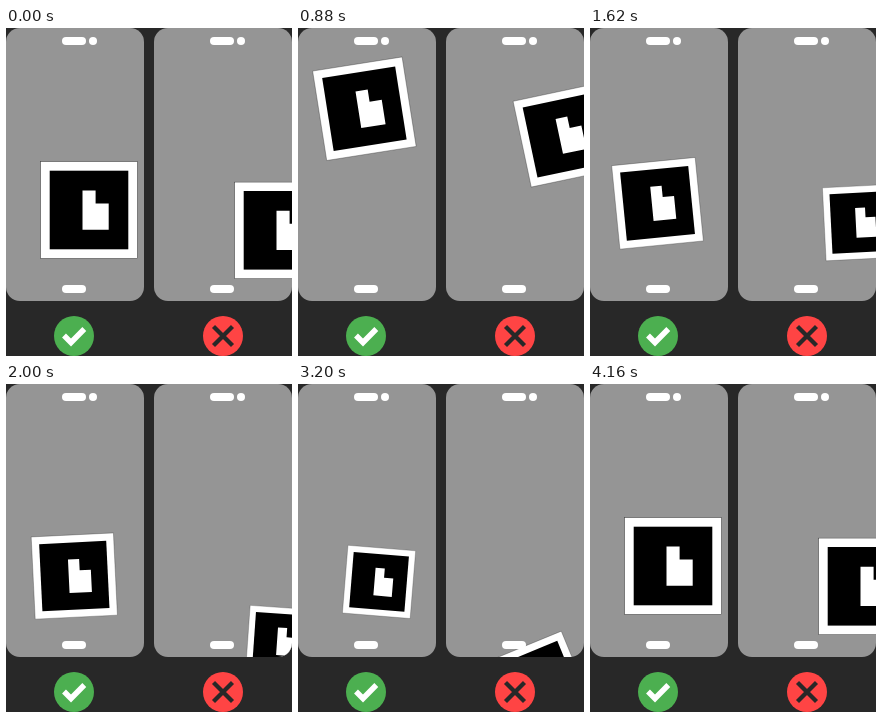
An HTML page that plays this animation: 286x328 px, repeating every 4180 ms.

```html
<!DOCTYPE html>
<html lang="en">
<head>
<meta charset="utf-8">
<title>Marker tracking</title>
<style>
  html, body { margin: 0; height: 100%; overflow: hidden; background: #282828; }
  svg { display: block; width: 100vw; height: 100vh; }
</style>
</head>
<body>
<svg viewBox="0 0 286 328">
  <defs>
    <clipPath id="screen"><rect width="138" height="273" rx="14"/></clipPath>
    <rect id="body" width="138" height="273" rx="14" fill="#959595"/>
    <g id="marker">
      <rect x="-48.2" y="-48.2" width="96.4" height="96.4" fill="#fff" stroke="#222" stroke-width=".35"/>
      <rect x="-39.3" y="-39.3" width="78.6" height="78.6"/>
      <path d="M-6.5-19.6h13.100v13.100h13.100v26.200h-26.200z" fill="#fff"/>
    </g>
    <g id="details" fill="#fff">
      <rect x="56" y="9" width="24" height="8" rx="4"/>
      <circle cx="87" cy="13" r="4"/>
      <rect x="56" y="257" width="24" height="8" rx="4"/>
    </g>
  </defs>
  <rect width="286" height="328" fill="#282828"/>
  <g>
    <use href="#body"/>
    <g clip-path="url(#screen)"><use id="good" href="#marker"/></g>
    <use href="#details"/>
  </g>
  <g transform="translate(148)">
    <use href="#body"/>
    <g clip-path="url(#screen)"><use id="bad" href="#marker"/></g>
    <use href="#details"/>
  </g>
  <g fill="none">
    <circle cx="68" cy="308" r="20" fill="#4caf50"/>
    <path d="M58 307.500l7 7L78.300 301" stroke="#fff" stroke-width="5.500"/>
    <circle cx="217" cy="308" r="20" fill="#ff4444"/>
    <path d="M207.500 298.500l19 19m0-19l-19 19" stroke="#282828" stroke-width="4.300"/>
  </g>
</svg>
<script>
const LOOP = 4180;
const REST = 4160; // both markers are back at their first pose and hold

// Key poses shared in time by both markers; each curve returns to its first value
const times = [0, 460, 900, 1300, 1640, 2000, 2660, 3740, REST];
const markers = {
  good: {
    x: [83, 83.5, 66, 66, 67.6, 68.3, 78, 82],
    y: [182, 82, 82, 134, 177, 192, 206, 185.3],
    side: [96, 94.5, 90, 85, 83.5, 82, 70, 77],
    angle: [0, -6, -9, -8.1, -5.5, -2.8, 0, 5.8]
  },
  bad: {
    x: [129, 121.6, 119, 119, 123, 127.6, 116.6, 91.2],
    y: [202.3, 138, 107, 132, 198, 257.4, 292, 268.6],
    side: [96, 94, 87, 79.2, 72.5, 67.5, 70, 91.4],
    angle: [0, -8.5, -12, -10.2, -2.5, 4, -7.5, -23.2]
  }
};

// Smooth curve through the key values, at rest at both ends
function sample(values, time) {
  const last = values.length;
  const value = i => values[i % last];
  const span = i => times[i + 1] - times[i];
  const rate = i => (value(i + 1) - value(i)) / span(i);
  const tangent = i => i % last === 0 ? 0
    : (rate(i - 1) * span(i) + rate(i) * span(i - 1)) / (span(i - 1) + span(i));
  let i = 0;
  while (i < last - 1 && time >= times[i + 1]) i++;
  const u = (time - times[i]) / span(i), v = 1 - u;
  return value(i) * v * v * (1 + 2 * u) + value(i + 1) * u * u * (3 - 2 * u)
    + span(i) * u * v * (v * tangent(i) - u * tangent(i + 1));
}

function render(time) {
  for (const [id, pose] of Object.entries(markers)) {
    const at = name => sample(pose[name], Math.min(time, REST));
    document.getElementById(id).setAttribute("transform",
      `translate(${at("x")} ${at("y")}) rotate(${at("angle")}) scale(${at("side") / 96})`);
  }
}

const start = performance.now();
function tick() {
  render((performance.now() - start) % LOOP);
  requestAnimationFrame(tick);
}
render(0);
requestAnimationFrame(tick);
</script>
</body>
</html>
```
